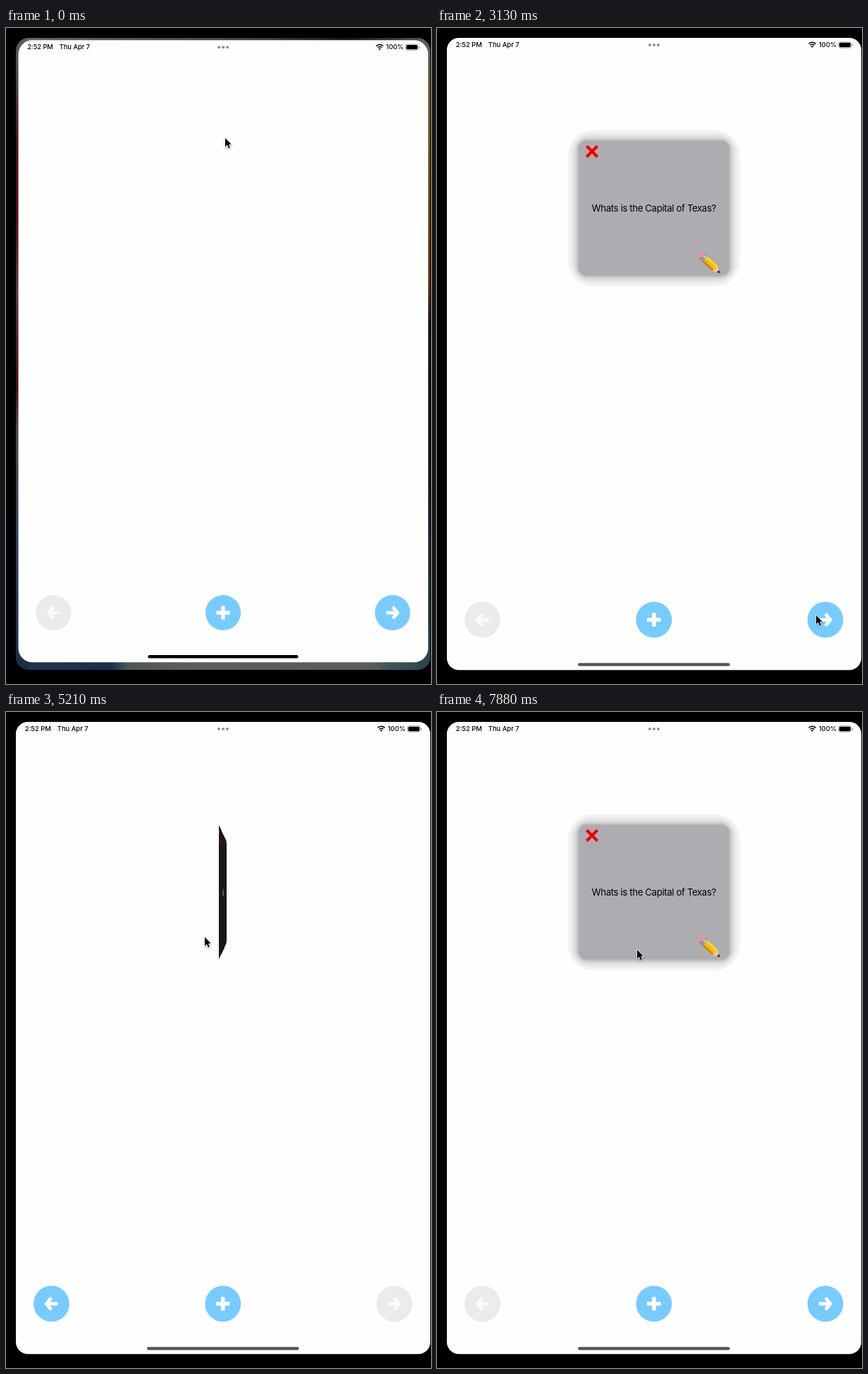
An HTML page with a canvas that plays this animation: 603 by 929 pixels, repeating every 8000 ms.

```html
<!DOCTYPE html>
<html lang="en">
<head>
<meta charset="utf-8">
<title>Flash cards</title>
<style>
html, body { margin: 0; width: 603px; height: 929px; overflow: hidden; background: #000; }
canvas { display: block; }
</style>
</head>
<body>
<canvas id="stage" width="603" height="929"></canvas>
<script>
const g = document.getElementById('stage').getContext('2d');
const LOOP = 8000, STEP = 148.65;
const FONT = 'Inter, "Liberation Sans", sans-serif';
const BLUE = '#78cbff', OFF = '#ebebeb', PAGE = '#fefefe';
const CARD = { w: 213.5, h: 190.5, cx: 307.75, cy: 255.25 };
const Q1 = 'Whats is the Capital of Texas?', Q2 = 'What day is it?', A2 = 'Thursday';
const SLIDE = 588;

// Pointer path: step, x, y
const PATH = [
  [0, 311, 156], [4, 311, 156], [8, 336, 284], [9, 337, 443], [10, 337, 443],
  [12, 328, 545], [15, 345, 790], [18, 458, 850], [21, 538, 832], [25, 540, 833],
  [28, 542, 834], [29, 542, 834], [33, 282, 319], [42, 282, 319],
  [47, 57, 838], [49, 57, 838], [53, 284, 337]
];

const clamp = v => Math.max(0, Math.min(1, v));
const smooth = v => { v = clamp(v); return v * v * (3 - 2 * v); };
const mix = (a, b, k) => a + (b - a) * k;
const ramp = (t, start, dur) => smooth((t - start) / dur);

function box(c, x, y, w, h, r, fill) {
  c.beginPath();
  c.roundRect(x, y, w, h, r);
  c.fillStyle = fill;
  c.fill();
}

function disc(x, y, r, fill) {
  g.beginPath();
  g.arc(x, y, r, 0, Math.PI * 2);
  g.fillStyle = fill;
  g.fill();
}

function poly(c, pts, fill) {
  c.beginPath();
  for (const [x, y] of pts) c.lineTo(x, y);
  c.closePath();
  c.fillStyle = fill;
  c.fill();
}

function lines(c, color, width, cap, ...runs) {
  c.strokeStyle = color;
  c.lineWidth = width;
  c.lineCap = cap;
  c.lineJoin = 'miter';
  c.beginPath();
  for (const run of runs) run.forEach(([x, y], i) => i ? c.lineTo(x, y) : c.moveTo(x, y));
  c.stroke();
}

function label(c, str, x, y, size, weight, color, align, tracking) {
  c.font = `${weight} ${size}px ${FONT}`;
  c.letterSpacing = (tracking || 0) + 'px';
  c.textAlign = align;
  c.textBaseline = 'alphabetic';
  c.fillStyle = color;
  c.fillText(str, x, y);
}

function bands(x0, y0, x1, y1, stops) {
  const grad = g.createLinearGradient(x0, y0, x1, y1);
  for (const [at, color] of stops) grad.addColorStop(at, color);
  return grad;
}

function wallpaper() {
  g.save();
  g.beginPath();
  g.roundRect(14, 14, 588, 895, 18);
  g.clip();
  g.fillStyle = bands(0, 14, 0, 909, [[0, '#5c5c5c'], [.06, '#4c4848'], [.16, '#4b1516'],
    [.28, '#5a0c10'], [.4, '#5b3b3a'], [.55, '#4e0b10'], [.62, '#50484c'], [.8, '#2e4156'], [1, '#1c2c42']]);
  g.fillRect(14, 14, 294, 895);
  g.fillStyle = bands(0, 14, 0, 909, [[0, '#5c5c5c'], [.08, '#6a5a30'], [.2, '#70511a'],
    [.4, '#5f300c'], [.46, '#10141a'], [.7, '#141c26'], [1, '#2c474c']]);
  g.fillRect(308, 14, 294, 895);
  g.fillStyle = bands(14, 0, 602, 0, [[0, '#22344c'], [.23, '#1c2f47'], [.27, '#4c5558'],
    [.4, '#5d5e59'], [.86, '#5a5c58'], [.9, '#3d5557'], [1, '#27464b']]);
  g.fillRect(32, 896, 552, 13);
  g.fillStyle = bands(14, 0, 602, 0, [[0, '#666'], [.6, '#453c42'], [.8, '#1c1518'], [1, '#555']]);
  g.fillRect(30, 14, 556, 4);
  g.restore();
}

function statusBar() {
  label(g, '2:52 PM', 26.7, 27.2, 9.4, 500, '#000', 'left');
  label(g, 'Thu Apr 7', 72.8, 27.2, 9.4, 500, '#000', 'left');
  label(g, '100%', 567, 27.2, 9.4, 500, '#000', 'right');
  for (const dx of [-6, 0, 6]) disc(307.9 + dx, 24, 2.1, '#939396');
  for (const r of [3.9, 6.9]) {
    g.beginPath();
    g.arc(532.4, 27.2, r, -Math.PI * .76, -Math.PI * .24);
    g.strokeStyle = '#000';
    g.lineWidth = 1.6;
    g.lineCap = 'butt';
    g.stroke();
  }
  poly(g, [[532.4, 28], [530.7, 26.1], [532.4, 25.2], [534.1, 26.1]], '#000');
  g.beginPath();
  g.roundRect(569.4, 19.7, 18.6, 8.6, 2.6);
  g.strokeStyle = '#999';
  g.lineWidth = .8;
  g.stroke();
  box(g, 570.6, 20.8, 16.2, 6.4, 1.6, '#000');
  box(g, 588.9, 22.6, 1.2, 2.9, .6, '#999');
}

function arrow(x, dir, on) {
  const y = 838;
  disc(x, y, 25.4, on ? BLUE : OFF);
  lines(g, on ? '#fff' : '#fafafa', 4.8, 'butt',
    [[x + dir * .2, y - 8.4], [x + dir * 7, y], [x + dir * .2, y + 8.4]].map(([px, py]) => [px, py]),
    [[x - dir * 9, y], [x + dir * 6, y]]);
}

function buttons(first) {
  arrow(64.5, -1, !first);
  arrow(551, 1, first);
  disc(307.8, 838, 25.4, BLUE);
  box(g, 298, 835.3, 19.6, 5.4, 1.3, '#fff');
  box(g, 305.1, 828.2, 5.4, 19.6, 1.3, '#fff');
}

function pencil(c) {
  c.save();
  c.translate(64.2, 64.2);
  c.rotate(.75);
  box(c, 0, -5.6, 9, 11.2, 3, '#e9929f');
  c.fillStyle = '#b9606f';
  c.fillRect(5.5, 1.8, 3, 3.8);
  c.fillStyle = '#8d979c';
  c.fillRect(6.6, -5.6, 5, 11.2);
  c.fillStyle = '#bcc6ca';
  c.fillRect(6.6, -3.6, 5, 3);
  c.fillStyle = '#fcd02e';
  c.fillRect(11.4, -5.5, 19.6, 4);
  c.fillStyle = '#f4b81c';
  c.fillRect(11.4, -1.5, 19.6, 4);
  c.fillStyle = '#c98a0d';
  c.fillRect(11.4, 2.5, 19.6, 3);
  poly(c, [[30.5, -5.5], [40, -.4], [40, .4], [30.5, 5.5]], '#ecc690');
  poly(c, [[36.3, -2.4], [40.4, -.3], [40.4, .3], [36.3, 2.4]], '#3d3a38');
  c.restore();
}

// Card face, centred on the context's origin
function face(c, text, back) {
  const { w, h } = CARD;
  box(c, -w / 2, -h / 2, w, h, 11, back ? '#181818' : '#adacb1');
  lines(c, '#f00000', 4.3, 'butt', [[-95.4, -87.9], [-80.2, -72.7]], [[-80.2, -87.9], [-95.4, -72.7]]);
  label(c, text, 0, 4.8, 13.2, 400, back ? '#fff' : '#000', 'center', -.36);
  if (!back) pencil(c);
}

const GLOW = [[15.5, '#f3f3f3'], [12, '#eeeeee'], [9.5, '#e7e7e7'], [7, '#dedede'],
  [4.8, '#d3d3d3'], [2.8, '#c7c7c7'], [1.2, '#bbbbbd']];

function card(dx, text, back) {
  const { w, h, cx, cy } = CARD;
  g.save();
  g.translate(cx + dx, cy);
  for (const [m, color] of GLOW)
    box(g, -w / 2 - m, -h / 2 - m, w + 2 * m, h + 2 * m, 11 + m * 1.6, color);
  face(g, text, back);
  g.restore();
}

const side = document.createElement('canvas');
side.width = CARD.w * 2;
side.height = CARD.h * 2;
const sg = side.getContext('2d');

// Perspective turn about the vertical axis, drawn column by column
function flip(p) {
  if (p <= .004) return card(0, Q2, false);
  if (p >= .99) return card(0, A2, true);
  const { w, h, cx, cy } = CARD, half = w / 2, dist = 667;
  const a = p * Math.PI, s = Math.sin(a), c = Math.cos(a), back = c < 0;
  sg.setTransform(1, 0, 0, 1, 0, 0);
  sg.clearRect(0, 0, side.width, side.height);
  sg.setTransform(2, 0, 0, 2, w, h);
  face(sg, back ? A2 : Q2, back);

  const far = dist + half * s;
  const project = u => u * c * dist / (far - u * s);
  const unproject = x => x * far / (c * dist + x * s);
  const ends = [project(-half), project(half)].sort((m, n) => m - n);
  g.imageSmoothingQuality = 'high';
  for (let x = ends[0]; x < ends[1] - .01; x++) {
    const x2 = Math.min(x + 1, ends[1]);
    const u1 = unproject(x), u2 = unproject(x2);
    const k = dist / (far - (u1 + u2) / 2 * s);
    const from = back ? -u1 : u1, to = back ? -u2 : u2;
    const sx = Math.max(0, (from + half) * 2);
    const sw = Math.min(side.width - sx, (to - from) * 2);
    if (sw > 0)
      g.drawImage(side, sx, 0, sw, side.height, cx + x, cy - h / 2 * k, x2 - x + .3, h * k);
  }
}

function cards(n, t) {
  if (n < 3) return;
  if (n < 25) return card(0, Q1);
  if (n < 34) {
    const k = ramp(t, 3690, 578);
    if (k < 1) card(-SLIDE * k, Q1);
    return card(SLIDE * (1 - k), Q2);
  }
  if (n < 48) return flip(ramp(t, 5038, 325) - ramp(t, 6060, 325));
  const k = ramp(t, 6985, 420);
  if (k < 1) card(-SLIDE * k, Q2);
  card(-SLIDE * (1 - k), Q1);
}

function pointer(n) {
  let i = 0;
  while (i < PATH.length - 2 && n >= PATH[i + 1][0]) i++;
  const [n0, x0, y0] = PATH[i], [n1, x1, y1] = PATH[i + 1];
  const k = smooth((n - n0) / (n1 - n0));
  const shape = [[0, 0], [0, 12.2], [2.8, 9.6], [4.9, 14.2], [7, 13.2], [5, 8.9], [8.6, 8.6]];
  g.save();
  g.translate(mix(x0, x1, k), mix(y0, y1, k));
  g.shadowColor = 'rgba(0,0,0,.4)';
  g.shadowBlur = 2;
  g.shadowOffsetY = 1;
  lines(g, '#fff', 1.6, 'round', [...shape, [0, 0]]);
  g.shadowColor = 'transparent';
  poly(g, shape, '#000');
  g.restore();
}

function draw(time) {
  const n = Math.floor(time % LOOP / STEP), t = n * 148.7;
  const zoom = n < 3 ? [1, .35, .08][n] : 0;
  g.setTransform(1, 0, 0, 1, 0, 0);
  g.fillStyle = '#000';
  g.fillRect(0, 0, 603, 929);
  if (zoom) wallpaper();

  g.save();
  g.transform(1 - .0113 * zoom, 0, 0, 1 - .0162 * zoom, 3.73 * zoom, 3.6 * zoom);
  box(g, 14, 14, 588, 895.3, 17 + 3 * zoom, PAGE);
  g.clip();
  statusBar();
  cards(n, t);
  buttons(n < 25 || n >= 48);
  box(g, 200, 899, 215.6, 4.6, 2.3, zoom ? '#000' :
    bands(0, 899, 0, 903.6, [[0, '#7c7c7c'], [.5, '#555'], [1, '#444']]));
  g.restore();
  pointer(n);
}

const begin = performance.now();
function tick(now) {
  draw(Math.max(0, now - begin));
  requestAnimationFrame(tick);
}
draw(0);
requestAnimationFrame(tick);
</script>
</body>
</html>
```
